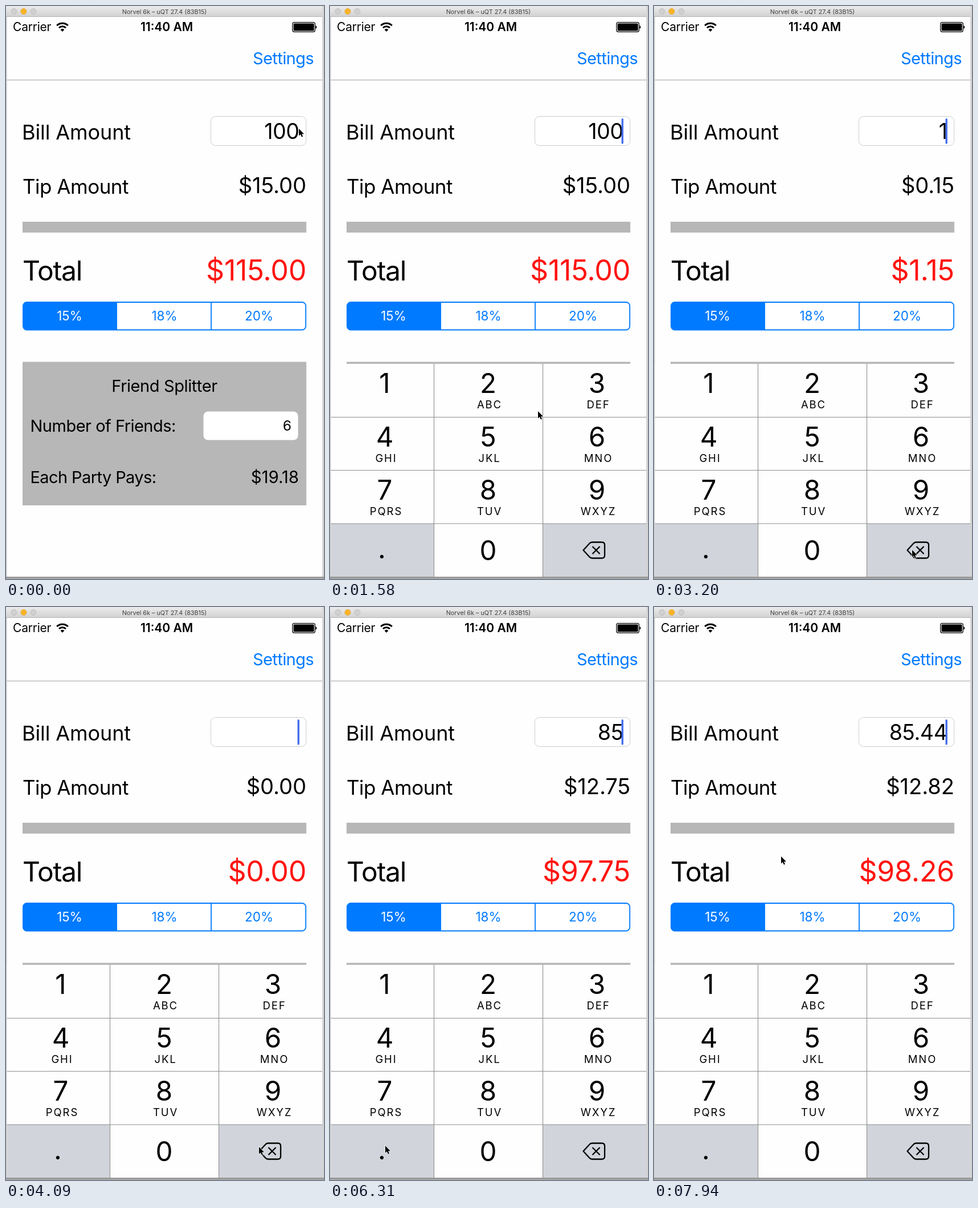
Recreate the animation shown at these times as an HTML page. Size 558x1004 px, loop 8000 ms.

```html
<!DOCTYPE html>
<html lang="en">
<head>
<meta charset="utf-8">
<title>Tip calculator</title>
<style>
  html, body { margin: 0; width: 100%; height: 100%; overflow: hidden; background: #c4c4c4; }
  svg { display: block; width: 558px; height: 1004px; }
  text { font-family: Inter, Roboto, sans-serif; fill: #000; white-space: pre; }
  .mid { text-anchor: middle; }
  .end { text-anchor: end; }
  .blue { fill: #007aff; }
  .white { fill: #fff; }
  .red { fill: #ff1410; }
  .title { fill: #404040; }
  .time { font-weight: 600; }
</style>
</head>
<body>
<svg viewBox="0 0 558 1004">
  <defs>
    <linearGradient id="chrome" x2="0" y2="1">
      <stop stop-color="#ebebeb"/><stop offset="1" stop-color="#d2d2d2"/>
    </linearGradient>
    <linearGradient id="shadow" x2="0" y2="1">
      <stop stop-color="#8c8c8c"/><stop offset="1" stop-color="#b0b0b0"/>
    </linearGradient>
    <clipPath id="screen"><rect x="1.5" y="19" width="553.5" height="981"/></clipPath>
  </defs>

  <rect width="558" height="1004" fill="#c4c4c4"/>
  <rect x="555" width="3" height="1004" fill="#d2d2d2"/>
  <rect y="1000" width="558" height="4" fill="url(#shadow)"/>
  <rect x="1.5" y="18" width="553.5" height="982" fill="#fefefe"/>
  <rect width="555.5" height="18.5" fill="url(#chrome)"/>
  <path d="M0 18.5H555.5" stroke="#b4b4b4"/>
  <g fill="#d0d0d0" stroke="#b9b9b9" stroke-width=".8">
    <circle cx="14" cy="9.5" r="5"/>
    <circle cx="31" cy="9.5" r="5" fill="#fdb427" stroke="#dfa023"/>
    <circle cx="48" cy="9.5" r="5"/>
  </g>

  <g fill="none" stroke="#000" stroke-width="3">
    <path d="M89.2 34.2a14 14 0 0 1 19.6 0M93 38.3a8.6 8.6 0 0 1 12 0"/>
    <path d="M99 45l-3.4-3.6a5 5 0 0 1 6.8 0Z" fill="#000" stroke="none"/>
  </g>
  <rect x="502.7" y="28.7" width="39.6" height="16.6" rx="3" fill="none" stroke="#000" stroke-width="1.2"/>
  <rect x="504.5" y="30.5" width="36" height="13" rx="1.5"/>
  <path d="M543.4 34q2 1 2 3t-2 3Z"/>
  <path d="M1.5 129.7H555" stroke="#b4b4b4" stroke-width="1.3"/>

  <rect x="359.5" y="193.5" width="167" height="51" rx="8" fill="#fff" stroke="#cdcdcd"/>
  <rect x="29" y="378" width="498" height="19" fill="#b7b7b7"/>
  <rect x="30" y="519" width="496" height="48.5" rx="6.5" fill="#fff" stroke="#007aff" stroke-width="1.8"/>
  <path d="M195 519H36.500q-6.500 0-6.500 6.500V561q0 6.500 6.500 6.500H195Z" class="blue"/>
  <path d="M360 519V567.500" stroke="#007aff" stroke-width="1.8"/>
  <rect x="29" y="623.5" width="498" height="251.5" fill="#b7b7b7"/>
  <rect x="346.500" y="710.500" width="166" height="50" rx="8" fill="#fff"/>
  <g id="labels"></g>
  <rect id="caret" x="511.500" y="197" width="3.300" height="44.500" rx="1.500" fill="#4169ee"/>
  <g clip-path="url(#screen)"><g id="keyboard"></g></g>
  <path id="pointer" d="M0 0V12.600L2.900 10 4.900 14.600 7 13.700 5 9.200H9Z"
        stroke="#fff" stroke-width="1.200" paint-order="stroke"/>
</svg>
<script>
const LOOP = 8000, FIRST_TICK = 540, TICK = 148;
const $ = id => document.getElementById(id);

const svgText = (x, y, size, str, cls = '', spacing = 0, id = '') =>
  `<text x="${x}" y="${y}" font-size="${size}" class="${cls}" letter-spacing="${spacing}" id="${id}">${str}</text>`;

$('labels').innerHTML = [
  [278, 13.5, 10.8, 'Norvel 6k – uQT 27.4 (83B15)', 'mid title'],
  [12, 44, 21, 'Carrier', '', -.2],
  [282, 44, 21, '11:40 AM', 'mid time'],
  [540, 102, 29, 'Settings', 'end blue', -.6],
  [28, 234, 36, 'Bill Amount', '', -.1],
  [514.5, 232.5, 37.5, '', 'end', -.4, 'bill'],
  [29, 328.5, 35, 'Tip Amount', '', -.5],
  [527, 327.5, 38, '', 'end', 0, 'tip'],
  [29, 480.5, 48, 'Total', '', -1.3],
  [527, 481, 50, '', 'end red', -.2, 'total'],
  [111.5, 551, 22.5, '15%', 'mid white'],
  [278, 551, 22.5, '18%', 'mid blue'],
  [444, 551, 22.5, '20%', 'mid blue'],
  [278, 676, 29, 'Friend Splitter', 'mid', -.4],
  [42.5, 746, 29, 'Number of Friends:', '', -.5],
  [501, 744, 24.5, '6', 'end'],
  [42.5, 836, 29, 'Each Party Pays:', '', -.6],
  [514, 835.5, 29.4, '$19.18', 'end'],
].map(args => svgText(...args)).join('');

// Keypad: column and row edges, then keys in reading order.
const cols = [1.5, 182.5, 373.5, 555], rows = [627, 720.5, 813.5, 907, 1000];
const keys = ['1', '2 ABC', '3 DEF', '4 GHI', '5 JKL', '6 MNO', '7 PQRS', '8 TUV', '9 WXYZ', '.', '0', 'del'];
const WHITE = '#fefefe', GREY = '#d1d4db';
const restFill = key => key === '.' || key === 'del' ? GREY : WHITE;
const deleteIcon = `<path d="M444.500 953.500L455 942Q457 939.500 460 939.500H477Q482 939.500 482 944.500V962.500Q482 967.500 477 967.500H460Q457 967.500 455 965Z
  M460.500 947L473.500 960M473.500 947L460.500 960" fill="none" stroke="#000" stroke-width="2.300" stroke-linejoin="round"/>`;

const keyFaces = keys.map((entry, i) => {
  const [key, letters] = entry.split(' '), c = i % 3, r = Math.floor(i / 3);
  const x = [96, 277.5, 468.5][c], top = rows[r];
  const face = key === 'del' ? deleteIcon
    : key === '.' ? svgText(91, 968, 48, key, 'mid')
    : svgText(x, r === 3 ? 971 : top + 51, 47.5, key, 'mid');
  const sub = letters ? svgText(x + 2.5, top + 78, 18.5, letters, 'mid', 1.9) : '';
  return `<rect x="${cols[c]}" y="${top}" width="${cols[c + 1] - cols[c]}" height="${rows[r + 1] - top}" data-key="${key}"/>${face}${sub}`;
});
const grid = `M182.500 627V1000M373.500 627V1000` + rows.slice(1, 4).map(y => `M1.500 ${y}H555`).join('');
$('keyboard').innerHTML = keyFaces.join('') + `<path d="${grid}" stroke="#8e8e8e" stroke-width="1.100"/>`;
const keyRects = [...$('keyboard').querySelectorAll('rect')];

// Pointer way points: time, x, y.
const path = [
  [0, 514, 215], [210, 513, 217], [840, 513, 217], [990, 505, 260], [1130, 470, 400], [1280, 425, 560],
  [1430, 385, 670], [1576, 365, 710], [1880, 325, 810], [2170, 297, 940], [2320, 320, 985],
  [2470, 370, 990], [2760, 453, 953], [3796, 453, 953], [4092, 444, 946], [4390, 375, 912],
  [4684, 171, 850], [4980, 225, 842], [5280, 261, 832], [5430, 261, 832], [5572, 263, 828],
  [5868, 270, 765], [6016, 270, 765], [6312, 97, 944], [6608, 97, 944], [6904, 88, 775],
  [7500, 88, 775], [7644, 110, 700], [7792, 170, 560], [7940, 223, 437],
];
const bills = [[0, '100'], [2900, '10'], [3050, '1'], [3790, ''], [5565, '8'], [6010, '85'],
  [6600, '85.'], [7190, '85.4'], [7490, '85.44']];
const presses = [['del', 2900, 3190], ['del', 3790, 4085], ['8', 5415, 5565], ['5', 5860, 6010],
  ['.', 6455, 6600], ['4', 7045, 7190], ['4', 7340, 7490]];
const caretOff = [[0, 535], [1130, 1430], [2015, 2460], [4380, 4680], [4975, 5275]];

const within = (t, [from, to]) => t >= from && t < to;
const hold = t => t < 210 ? 0 : t < FIRST_TICK - 8 ? 210
  : FIRST_TICK + Math.floor((t - FIRST_TICK + 8) / TICK) * TICK;

function pointerAt(t) {
  const i = path.findIndex(p => p[0] > t);
  if (i < 0) return path[path.length - 1].slice(1);
  const [t0, x0, y0] = path[i - 1], [t1, x1, y1] = path[i];
  const k = (t - t0) / (t1 - t0);
  return [x0 + (x1 - x0) * k, y0 + (y1 - y0) * k];
}

function keyboardOffset(t) {
  if (t < FIRST_TICK) return 380;
  const left = Math.max(0, 1 - (t - FIRST_TICK + 100) / 300);
  return 373 * left * left;
}

function draw() {
  const t = hold(performance.now() % LOOP);
  const bill = bills.filter(b => b[0] <= t).pop()[1];
  const amount = Number(bill), tip = amount * .15;
  $('bill').textContent = bill;
  $('tip').textContent = '$' + tip.toFixed(2);
  $('total').textContent = '$' + (amount + tip).toFixed(2);

  const press = presses.find(([, ...span]) => within(t, span));
  for (const rect of keyRects) {
    const { key } = rect.dataset, rest = restFill(key);
    const pressed = press && press[0] === key;
    rect.setAttribute('fill', !pressed ? rest : rest === WHITE ? GREY : WHITE);
  }
  $('keyboard').setAttribute('transform', `translate(0 ${keyboardOffset(t)})`);
  $('caret').style.visibility = caretOff.some(span => within(t, span)) ? 'hidden' : 'visible';
  $('pointer').setAttribute('transform', `translate(${pointerAt(t)})`);
  requestAnimationFrame(draw);
}
draw();
</script>
</body>
</html>
```
